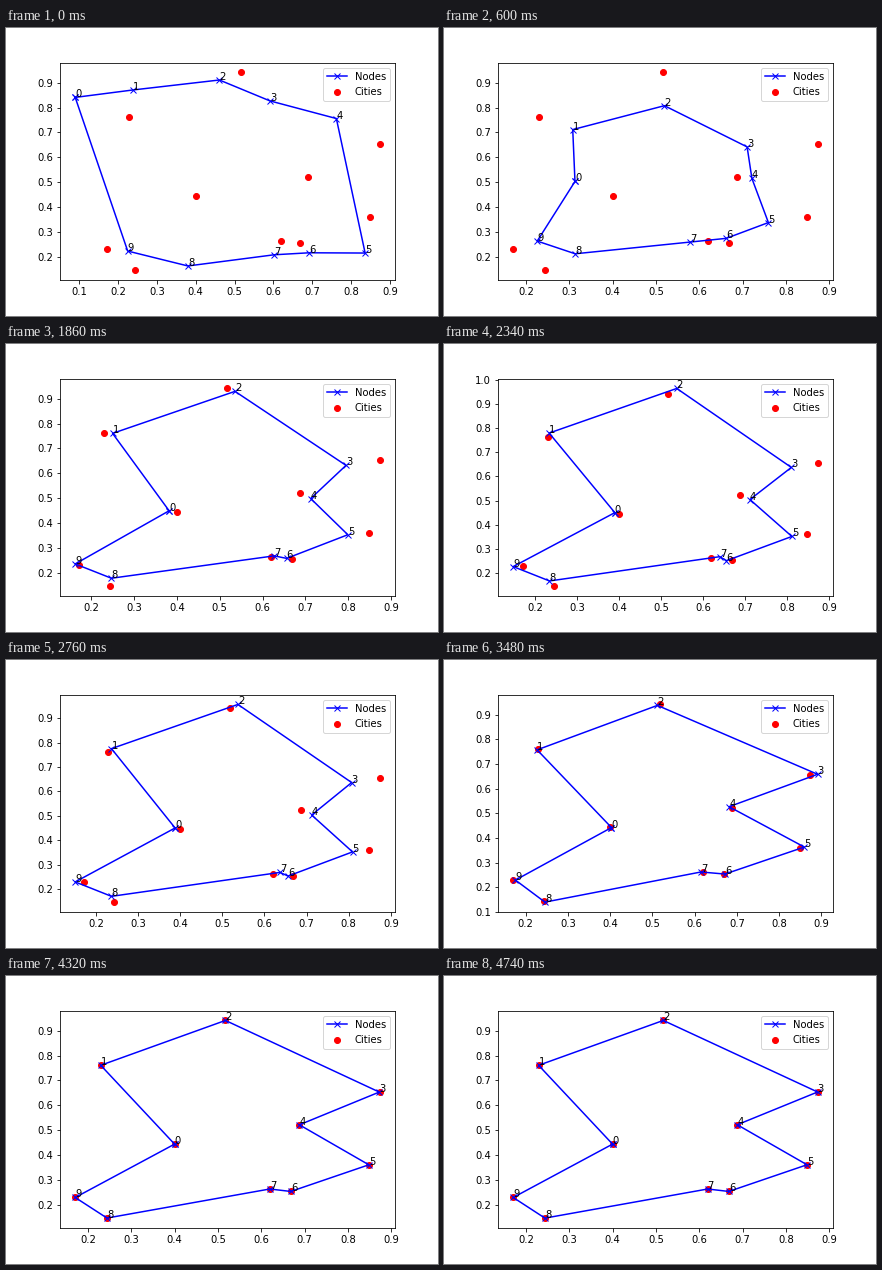
Write a matplotlib script that moves like this. It is 432x288 px and loops after 4.8 s.

```python
import numpy as np
import matplotlib.pyplot as plt
from matplotlib.animation import FuncAnimation

FRAMES, INTERVAL = 80, 60
PINCHED, SPREAD, END = 21, 46, FRAMES - 1

plt.rcParams["font.family"] = "DejaVu Sans"
plt.rcParams["font.size"] = 10


def points(xs, ys):
    return np.column_stack([xs, ys])


# Cities in tour order; every node ends on the city with its index.
cities = points(
    [.4000, .2293, .5171, .8732, .6878, .8488, .6683, .6195, .2439, .1707],
    [.4439, .7610, .9414, .6536, .5219, .3609, .2536, .2634, .1463, .2293])

# The first ring, and the shape from which the nodes settle.
ring = points(
    [.090, .239, .461, .591, .762, .836, .692, .602, .380, .225],
    [.841, .871, .911, .827, .756, .215, .216, .208, .163, .223])
spread = points(
    [.388, .237, .537, .807, .712, .809, .656, .637, .237, .151],
    [.450, .775, .956, .636, .503, .352, .253, .268, .170, .229])


def tighten(shape, pull=.25, shrink=(.10, .17), centre=(.50, .35)):
    """Elastic band: draw nodes to their neighbours and to the centre."""
    beside = (np.roll(shape, 1, axis=0) + np.roll(shape, -1, axis=0)) / 2
    return shape + pull * (beside - shape) + shrink * (centre - shape)


pinched = tighten(spread)


def mix(a, b, w):
    return a + (b - a) * w


def nodes_at(t):
    if t < PINCHED:  # quick contraction
        return mix(pinched, ring, (1 - t / PINCHED) ** 3)
    if t < SPREAD:  # opening, slightly too far
        u = (t - PINCHED) / (SPREAD - PINCHED)
        return mix(pinched, spread, 4 * u - 3 * u ** 1.5)
    u = (t - SPREAD) / (END - SPREAD)  # damped swing onto the cities
    return mix(cities, spread, (1 - u) ** 2 * np.cos(2 * np.pi * u))


fig, ax = plt.subplots(figsize=(6, 4), dpi=72)
fig.subplots_adjust(left=.125, right=.9, bottom=.125, top=.88)


def draw(frame):
    ax.clear()
    nodes = nodes_at(frame)
    loop = np.vstack([nodes, nodes[:1]])
    ax.plot(*loop.T, "bx-", label="Nodes")
    ax.scatter(*cities.T, c="r", label="Cities")
    for i, (x, y) in enumerate(nodes):
        ax.text(x, y, str(i))
    ax.legend(loc="upper right")


anim = FuncAnimation(fig, draw, frames=FRAMES, interval=INTERVAL,
                     init_func=lambda: None, repeat=True, repeat_delay=0)
plt.show()
```
